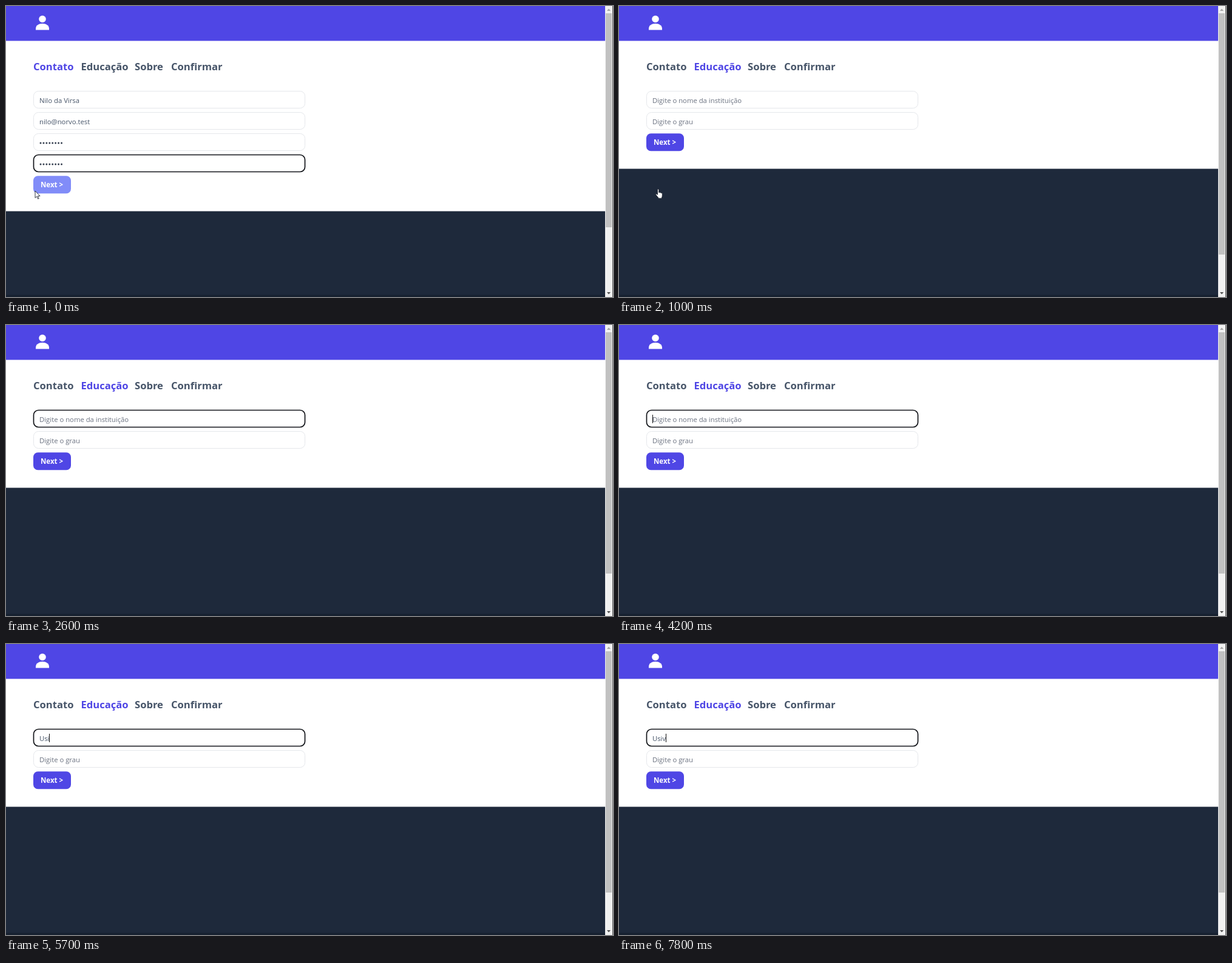
An HTML page that plays this animation: 1000x480 px, repeating every 8 s.

```html
<!DOCTYPE html>
<html lang="pt">
<head>
<meta charset="utf-8">
<title>Formulário em etapas</title>
<style>
  html, body { margin: 0; width: 100%; height: 100%; overflow: hidden; background: #fff; }
  svg { display: block; font: 11.3px "Open Sans", "Noto Sans", sans-serif; }
  .bold { font-weight: 700; }
  .tabs { font-size: 16.6px; }
  .field { fill: #fff; stroke: #e5e7eb; }
  .field.focus { stroke: #111318; stroke-width: 1.7; }
  .value { fill: #475569; }
  .hint { fill: #6b7280; }
  .dots { stroke: #374151; stroke-width: 3; stroke-linecap: round; stroke-dasharray: 0 4.93; }
  #cursor path { fill: #fff; stroke: #1f2430; stroke-width: .9; stroke-linejoin: round; }
  #cursor #beam { fill: none; }
</style>
</head>
<body>
<svg width="1000" height="480" viewBox="0 0 1000 480">
  <rect width="987" height="57.5" fill="#4f46e5"/>
  <g fill="#fff">
    <circle cx="60" cy="21.5" r="5.8"/>
    <path d="M49 39.6v-2c0-5.800 5-8.600 11-8.600s11 2.800 11 8.600v2z"/>
  </g>
  <rect id="footer" width="987" height="220" fill="#1e293b"/>
  <rect y="476.500" width="987" height="3.500" fill="#172130"/>

  <g class="bold tabs" id="tabs">
    <text x="45" y="106">Contato</text>
    <text x="123.500" y="106">Educação</text>
    <text x="212" y="106">Sobre</text>
    <text x="272" y="106">Confirmar</text>
  </g>

  <g id="contact">
    <text class="value" x="55" y="159.500">Nilo da Virsa</text>
    <text class="value" x="55" y="194.500">nilo@norvo.test</text>
    <path class="dots" d="M57 226h35M57 261h35"/>
  </g>
  <g id="education">
    <text id="school" x="55" y="159.500"></text>
    <text class="hint" x="55" y="194.500">Digite o grau</text>
    <path id="caret" stroke="#111" d="M0 148v14"/>
  </g>
  <g id="button">
    <rect x="45" width="62" height="29" rx="7.500"/>
    <text class="bold" x="57" y="19" fill="#fff" font-size="11.5">Next &gt;</text>
  </g>

  <rect x="987" width="13" height="480" fill="#f1f1f1"/>
  <rect id="thumb" x="988" y="12" width="10" fill="#c1c1c1"/>
  <path fill="#a3a3a3" d="M990 8l3-3.500 3 3.500z"/>
  <path fill="#505050" d="M990 472l3 3.500 3-3.500z"/>
  <rect x="999" width="1" height="480" fill="#555"/>

  <g id="cursor">
    <path id="arrow" d="M0 0v11.500l2.700-2.500 1.800 4.200 1.700-.7-1.800-4.100h3.600z"/>
    <path id="hand" d="M3.500 9V2.200c0-1.600 2.200-1.600 2.200 0v4.600c.3-1 2-.8 2 .3 .5-.7 1.900-.4 1.900 .6 .6-.6 1.700-.1 1.700 .8v3.500c0 1.500-.8 2.200-.9 4.200H5c0-1.600-3-3.600-4.300-6.100-.5-1.300 .9-1.900 2.800 .2z"/>
    <path id="beam" d="M-2-6h4M0-6V6M-2 6h4"/>
  </g>
</svg>
<script>
const LOOP = 8000;
const $ = id => document.getElementById(id);
const show = (el, on) => el.setAttribute("display", on ? "inline" : "none");
const latest = (steps, t) => steps.findLast(step => step[0] <= t);

const pointer = [
  [0, "arrow", 48, 305], [200, "hand", 49, 304], [300, "hand", 53, 302],
  [400, "hand", 57, 301], [500, "hand", 60, 301], [1200, "arrow", 62, 252],
  [1300, "beam", 66, 157], [1900, "arrow", 57, 237], [2000, "arrow", 50, 345],
  [2100, "none", 0, 0]
];
const typing = [
  [0, ""], [5500, "U"], [5600, "Us"], [5700, "Usi"], [7000, "Us"],
  [7100, "U"], [7500, "Us"], [7600, "Usi"], [7800, "Usiv"]
];
const caretSteps = [
  [0, 0], [1300, 1], [1500, 0], [2100, 1], [2600, 0], [3100, 1], [3600, 0],
  [4200, 1], [4700, 0], [5200, 1], [6300, 0], [6800, 1]
];

const fields = [0, 1, 2, 3].map(i => {
  const rect = document.createElementNS("http://www.w3.org/2000/svg", "rect");
  const box = { x: 45.5, y: 140.5 + 35 * i, width: 447, height: 28, rx: 8 };
  for (const key in box) rect.setAttribute(key, box[key]);
  $("contact").before(rect);
  return rect;
});

function render(t) {
  const first = t < 1000;
  const count = first ? 4 : 2;
  const focused = t < 800 ? 3 : t >= 1300 ? 0 : -1;
  const buttonTop = 140.3 + 35 * count;

  fields.forEach((field, i) => {
    show(field, i < count);
    field.setAttribute("class", i === focused ? "field focus" : "field");
  });
  [...$("tabs").children].forEach((tab, i) =>
    tab.setAttribute("fill", i === (first ? 0 : 1) ? "#4f46e5" : "#475569"));
  show($("contact"), first);
  show($("education"), !first);
  $("button").setAttribute("transform", `translate(0 ${buttonTop})`);
  $("button").setAttribute("fill", first ? "#818cf8" : "#4f46e5");
  $("footer").setAttribute("y", buttonTop + 58.2);
  $("thumb").setAttribute("height", first ? 353 : 398);

  const text = latest(typing, t)[1];
  const school = $("school");
  school.textContent = text || "Digite o nome da instituição";
  school.setAttribute("class", text ? "value" : "hint");
  const caretX = 55.5 + (text && !first ? Math.round(school.getComputedTextLength()) : 0);
  $("caret").setAttribute("transform", `translate(${caretX} 0)`);
  show($("caret"), latest(caretSteps, t)[1]);

  const [, kind, x, y] = latest(pointer, t);
  for (const shape of $("cursor").children) show(shape, shape.id === kind);
  $("cursor").setAttribute("transform", `translate(${x} ${y})`);
}

function tick() {
  render(performance.now() % LOOP);
  requestAnimationFrame(tick);
}
tick();
</script>
</body>
</html>
```
